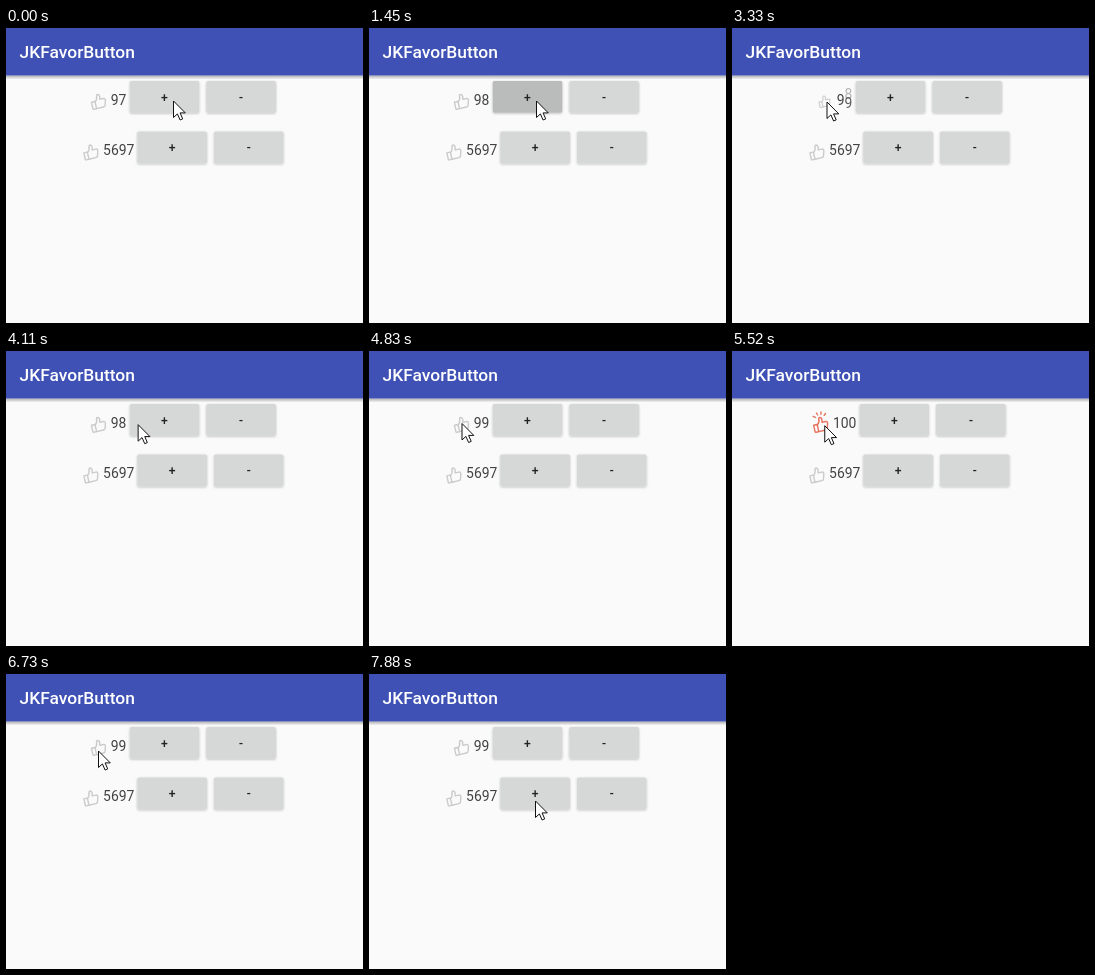
An HTML page for the animation above (8 s loop, 357 px wide and 295 px high).

```html
<!DOCTYPE html>
<html lang="en">
<head>
<meta charset="utf-8">
<title>JKFavorButton</title>
<style>
  html, body { margin: 0; width: 100%; height: 100%; overflow: hidden; background: #fafafa; }
  svg { display: block; width: 357px; height: 295px; font-family: Roboto, sans-serif; }
  .num { font-size: 13.9px; fill: #424242; }
  .sign { font-size: 12.2px; font-weight: 500; fill: #222; text-anchor: middle; }
  .thumb, .sparks { fill: none; stroke-width: 1.4; stroke-linejoin: round; stroke-linecap: round; }
  .sparks { stroke: #e8705f; }
</style>
</head>
<body>
<svg viewBox="0 0 357 295">
  <defs>
    <linearGradient id="shade" x2="0" y2="1">
      <stop offset="0" stop-color="#000" stop-opacity=".3"/>
      <stop offset="1" stop-color="#000" stop-opacity="0"/>
    </linearGradient>
    <filter id="lift" x="-10%" y="-20%" width="120%" height="150%">
      <feDropShadow dx="0" dy=".8" stdDeviation=".8" flood-opacity=".25"/>
    </filter>
  </defs>
  <rect width="357" height="295" fill="#fafafa"/>
  <rect y="47.5" width="357" height="4" fill="url(#shade)"/>
  <rect width="357" height="47.5" fill="#3f51b5"/>
  <text x="13.6" y="30" font-size="17.4" font-weight="500" fill="#fff">JKFavorButton</text>
  <g id="rows"></g>
  <path id="cursor" d="M0 0V16.5L3.9 12.9L6.6 19L9.2 17.9L6.6 11.9H11.8Z" fill="#fff" stroke="#111"/>
</svg>
<script>
const LOOP = 8000, DIGIT = 7.8, ROLL = 9.5;
const GREY = '#cbcbcb', RED = '#e8705f';
const $ = id => document.getElementById(id);

// Screen refreshes: [first, last, count]
const bursts = [
  [1210, 2000, 7], [2270, 2390, 2], [2520, 3050, 5], [3330, 4260, 8],
  [4410, 4830, 4], [5100, 5790, 6], [6070, 6730, 6], [7040, 7880, 7]
];
const ticks = [0];
for (const [a, b, n] of bursts)
  for (let i = 0; i < n; i++) ticks.push(Math.round((a + (b - a) * i / (n - 1)) / 10) * 10);

// Count changes: time, new value, liked, what was tapped
const taps = [
  { at: -1000, n: 97 },
  { at: 1210, n: 98, plus: true },
  { at: 2270, n: 99, liked: true },
  { at: 3330, n: 98 },
  { at: 4410, n: 99, plus: true },
  { at: 5100, n: 100, liked: true },
  { at: 6070, n: 99 }
];

// Pointer stops: time, x, y
const path = [
  [0, 167.5, 73], [1470, 167.5, 73], [2000, 99.5, 77.5], [2520, 99.5, 77.5],
  [3050, 95, 74], [3600, 95, 74], [4260, 153.5, 73.5], [4500, 153.5, 73.5],
  [4830, 93, 72.5], [5240, 93, 72.5], [5790, 92.5, 77], [7040, 92.5, 77],
  [7880, 166.5, 127], [LOOP, 166.5, 127]
];

const clamp = v => Math.min(1, Math.max(0, v));
const ease = v => v * v * (3 - 2 * v);

function pointer(t) {
  const i = Math.max(1, path.findIndex(p => p[0] > t));
  const [a, x, y] = path[i - 1], [b, u, v] = path[i];
  const k = ease(clamp((t - a) / (b - a)));
  return [x + (u - x) * k, y + (v - y) * k];
}

const label = (s, x, y, alpha = 1) =>
  `<text class="num" x="${x}" y="${y}" opacity="${alpha}">${s}</text>`;

function button(x, y, sign, press = 0) {
  return `<rect x="${x}" y="${y}" width="69.6" height="31.8" rx="1.7" fill="#d6d7d7" filter="url(#lift)"/>
    <rect x="${x}" y="${y}" width="69.6" height="31.8" rx="1.7" opacity="${press * .13}"/>
    <text class="sign" x="${x + 34.8}" y="${y + 20.6}">${sign}</text>`;
}

function thumb(x, y, scale, color) {
  return `<g class="thumb" stroke="${color}" transform="translate(${x} ${y}) rotate(-13) scale(${scale})">
    <path d="M-7-.6H-3.4V6.7H-6.2Q-7 6.7-7 5.9Z"/>
    <path d="M-3.4 0C-1.2-1.6-.6-3.2-.5-6C-.2-7.6 2.3-7 2.4-4.6L1.8-1.6H5.6C7-1.6 7.4-.4 7 .8L5.6 5.5C5.2 6.4 4.6 6.7 3.6 6.7H-3.4"/>
  </g>`;
}

function sparks(x, y, k) {
  let d = '';
  for (const deg of [-58, -25, 8, 41]) {
    const a = (deg - 5) * Math.PI / 180, s = Math.sin(a), c = -Math.cos(a);
    d += `M${x + s * 6} ${y + c * 6}L${x + s * 8.3} ${y + c * 8.3}`;
  }
  return `<path class="sparks" d="${d}" opacity="${k}"/>`;
}

function count(from, to, p, x, y) {
  const a = String(from), b = String(to);
  if (p >= 1) return label(b, x, y);
  let same = 0;
  if (a.length === b.length) while (a[same] === b[same]) same++;
  const dir = to > from ? -1 : 1, left = x + same * DIGIT;
  return label(a.slice(0, same), x, y)
    + label(a.slice(same), left, y + dir * p * ROLL, 1 - p * p)
    + label(b.slice(same), left, y - dir * (1 - p) * ROLL, p);
}

function row(y, from, tap, dt) {
  const p = clamp(.38 + dt / 180);
  const digits = String(p < 1 ? Math.max(from, tap.n) : tap.n).length;
  const shift = (digits - 2) * 3.8;
  const numX = 104.7 - shift, btnX = 123.7 + shift, thumbX = 92.4 - shift;
  let scale = 1, color = tap.liked ? RED : GREY, glow = 0;
  if (!tap.plus && dt < 400) {
    scale = dt < 200 ? .78 : 1 + .08 * (1 - clamp((dt - 200) / 200));
    if (tap.liked && dt < 100) color = GREY;
  }
  if (tap.liked) glow = dt < 100 ? 0 : 1;
  const press = tap.plus ? 1 - clamp((dt - 130) / 270) : 0;
  return thumb(thumbX, y + 20.3, scale, color)
    + (glow ? sparks(thumbX, y + 16.2, glow) : '')
    + count(from, tap.n, p, numX, y + 23.7)
    + button(btnX, y, '+', press) + button(btnX + 76.6, y, '-');
}

const still = row(103.6, 5697, { n: 5697 }, 1000);

function draw(now) {
  const time = now % LOOP;
  const t = ticks.filter(k => k <= time).pop();
  const i = taps.filter(k => k.at <= t).length - 1;
  const tap = taps[i], from = (taps[i - 1] || tap).n;
  $('rows').innerHTML = row(53, from, tap, t - tap.at) + still;
  const [x, y] = pointer(t);
  $('cursor').setAttribute('transform', `translate(${x} ${y})`);
}

const start = performance.now();
(function loop() {
  draw(performance.now() - start);
  requestAnimationFrame(loop);
})();
</script>
</body>
</html>
```
